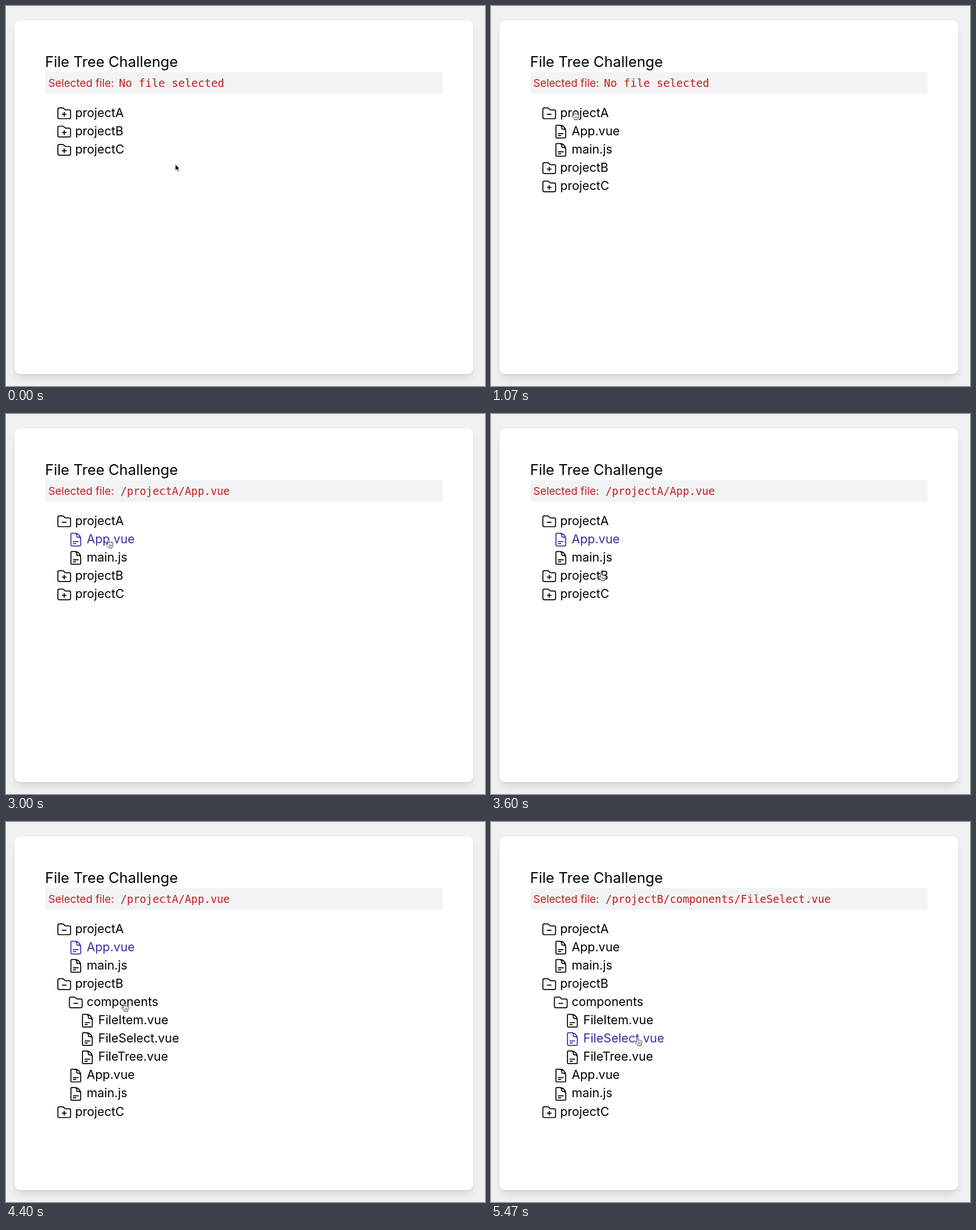
Write an HTML page that moves like this. It is 840 by 667 pixels and loops after 6.67 s.

```html
<!DOCTYPE html>
<html lang="en">
<head>
<meta charset="utf-8">
<title>File Tree Challenge</title>
<style>
  html, body { margin: 0; width: 100%; height: 100%; overflow: hidden; background: #f1f1f1; }
  .card {
    position: absolute; left: 15px; top: 25px; width: 804px; height: 621px;
    background: #fff; border-radius: 9px;
    box-shadow: 0 0 1px rgba(0,0,0,.12), 0 11px 16px -3px rgba(0,0,0,.1), 0 4px 6px -4px rgba(0,0,0,.1);
  }
  svg { position: absolute; left: 0; top: 0; }
  text { white-space: pre; font-family: Inter, sans-serif; font-optical-sizing: none; fill: #000; }
  .title { font-size: 25.7px; }
  .row text { font-size: 21.4px; }
  .row path { fill: none; stroke: #000; stroke-width: 1.5; stroke-linecap: round; stroke-linejoin: round; }
  .row.on text { fill: #3530a6; }
  .row.on path { stroke: #3530a6; }
  .status { font-size: 18.75px; fill: #c61e1e; }
  #path { font-family: "DejaVu Sans Mono", monospace; }
  #path.none { font-size: 19.2px; }
</style>
</head>
<body>
<div class="card"></div>
<svg width="840" height="667" viewBox="0 0 840 667">
  <text class="title" x="68.5" y="107.3">File Tree Challenge</text>
  <rect x="69" y="116" width="696.5" height="38.5" fill="#f2f3f5"/>
  <text class="status" x="74.2" y="141.8">Selected file:</text>
  <text class="status" id="path" y="141.8"></text>
  <g id="tree"></g>
  <g id="cursor">
    <path id="arrow" d="M4 0V10.6L6.5 8.4 8.2 12.4 10 11.6 8.3 7.8H11.6Z"
      fill="#000" stroke="#fff" stroke-width=".7"/>
    <g id="hand" stroke="#222" stroke-width=".9" stroke-linejoin="round" stroke-linecap="round">
      <path fill="#fff" d="M3.6 8.2V1.7a1.2 1.2 0 0 1 2.4 0V5.2c0-1 2.3-1 2.3.3 .2-.9 2.2-.7 2.3.4 .5-.7 2-.4 2 .9V9.5c0 2-1.3 2.7-1.5 5.1H5.2C5 12.6 2.6 11.2 1 8.6 .2 7.2 1.8 6.4 2.6 7.3Z"/>
      <path fill="none" stroke-width=".7" d="M6.2 9v3M8.1 9v3M10 9v3"/>
    </g>
  </g>
</svg>
<script>
const LOOP = 6670, STEP = 1000 / 15, ROW = 32.1, INDENT = 20.3;
const $ = id => document.getElementById(id);

const FOLDER = 'M13.06 6.31l-2.12-2.12a1.5 1.5 0 0 0-1.06-.44H4.5A2.25 2.25 0 0 0 2.25 6v12a2.25 2.25 0 0 0 2.25 2.25h15A2.25 2.25 0 0 0 21.75 18V9a2.25 2.25 0 0 0-2.25-2.25h-5.38a1.5 1.5 0 0 1-1.06-.44zM9 13.5h6';
const ICONS = {
  open: FOLDER,
  shut: FOLDER + 'M12 10.5v6',
  file: 'M19.5 14.25v-2.63a3.38 3.38 0 0 0-3.38-3.37h-1.5A1.12 1.12 0 0 1 13.5 7.13v-1.5a3.38 3.38 0 0 0-3.38-3.38H8.25M8.25 15h7.5M8.25 18H12M10.5 2.25H5.63c-.62 0-1.13.5-1.13 1.13v17.25c0 .62.5 1.12 1.13 1.12h12.75c.62 0 1.12-.5 1.12-1.12V11.25a9 9 0 0 0-9-9z'
};

// opens: the step at which a folder is clicked
const files = names => names.map(name => ({ name }));
const tree = [
  { name: 'projectA', opens: 16, kids: files(['App.vue', 'main.js']) },
  { name: 'projectB', opens: 55, kids: [
    { name: 'components', opens: 66, kids: files(['FileItem.vue', 'FileSelect.vue', 'FileTree.vue']) },
    ...files(['App.vue', 'main.js'])
  ] },
  { name: 'projectC', opens: Infinity, kids: [] }
];
const picks = [[81, '/projectB/components/FileSelect.vue'], [34, '/projectA/App.vue']];

// cursor stops: step, x, y
const stops = [
  [0, 293, 278], [2, 255, 252], [5, 160, 195], [7, 141, 185], [23, 141, 185], [27, 151, 200],
  [31, 164.5, 216], [44, 164.5, 216], [45, 175, 220.5], [49, 184, 250], [54, 188.5, 278],
  [55, 189, 280], [61, 202, 318], [69, 202, 318], [72, 246, 347], [74, 266.5, 366],
  [75, 269, 370], [78, 252, 378]
];

function cursorAt(n) {
  const i = stops.findIndex(s => s[0] > n);
  if (i < 0) return stops[stops.length - 1].slice(1);
  const [a, ax, ay] = stops[i - 1], [b, bx, by] = stops[i];
  const k = (n - a) / (b - a);
  return [ax + (bx - ax) * k, ay + (by - ay) * k];
}

function drawTree(n, picked) {
  let line = 0, out = '';
  const walk = (nodes, depth, base) => nodes.forEach(({ name, opens, kids }) => {
    const open = n >= opens, path = base + '/' + name;
    const icon = ICONS[kids ? (open ? 'open' : 'shut') : 'file'];
    out += `<g class="row${path === picked ? ' on' : ''}" transform="translate(${depth * INDENT} ${line++ * ROW})">
      <path transform="translate(88.4 174.6) scale(1.143)" d="${icon}"/>
      <text x="121.2" y="194.6">${name}</text></g>`;
    if (open) walk(kids, depth + 1, path);
  });
  walk(tree, 0, '');
  $('tree').innerHTML = out;
}

let last = -1;
function render(n) {
  if (n === last) return;
  last = n;
  const pick = picks.find(p => n >= p[0]);
  const label = $('path');
  label.textContent = pick ? pick[1] : 'No file selected';
  label.setAttribute('class', pick ? 'status' : 'status none');
  label.setAttribute('x', pick ? 200.7 : 198);
  drawTree(n, pick && pick[1]);

  const [x, y] = cursorAt(n), pointing = y < 266 || n > 16;
  $('cursor').setAttribute('transform', `translate(${x} ${y})`);
  $('hand').style.display = pointing ? '' : 'none';
  $('arrow').style.display = pointing ? 'none' : '';
}

const start = performance.now();
function tick() {
  const t = (performance.now() - start) % LOOP;
  render(Math.floor((t + 1) / STEP));
  requestAnimationFrame(tick);
}
tick();
</script>
</body>
</html>
```
